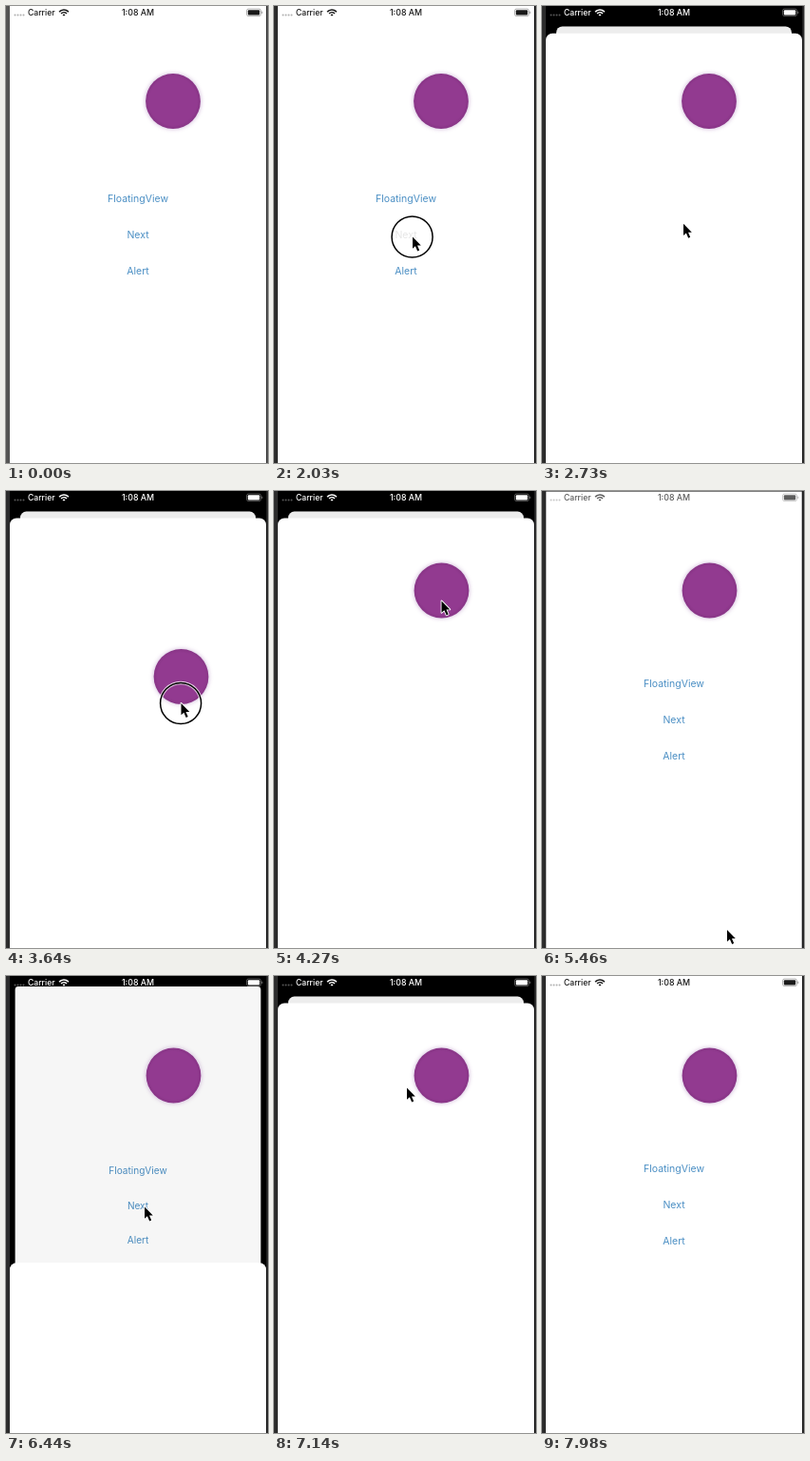
These frames come from a looping animation (276 by 480 pixels, 8000 ms). An HTML page with a canvas:

```html
<!DOCTYPE html>
<html lang="en">
<head>
<meta charset="utf-8">
<title>Floating view demo</title>
<style>
html, body { margin: 0; width: 276px; height: 480px; overflow: hidden; background: #fff; }
canvas { display: block; }
</style>
</head>
<body>
<canvas id="stage" width="276" height="480"></canvas>
<script>
const ctx = document.getElementById('stage').getContext('2d');
const LOOP = 8000, STEP = 70;
const LEFT = 4, WIDTH = 270, HEIGHT = 585, SHEET_TOP = 28.5, TRAVEL = HEIGHT - SHEET_TOP;
const FONT = 'Inter, Roboto, sans-serif';
const BLUE = '#4b8fc4';

// Each move brings the pointer to a new place; bend holds Bezier control points
const entry = { x: 138, y: 405 };
const moves = [
  { from: 350, to: 490, x: 172, y: 249 },
  { from: 770, to: 910, x: 146, y: 242 },
  { from: 2660, to: 3360, x: 176, y: 105 },
  { from: 3430, to: 3570, x: 184.5, y: 205.5 },
  { from: 3570, to: 3640, x: 184.5, y: 222.5 },
  { from: 3640, to: 4200, x: 176.5, y: 115, bend: [{ x: 165, y: 400 }, { x: 20, y: 220 }] },
  { from: 4340, to: 4690, x: 111, y: 78 },
  { from: 4760, to: 5390, x: 195, y: 460.5 },
  { from: 5460, to: 6090, x: 146, y: 242 },
  { from: 6650, to: 7000, x: 140, y: 117 },
  { from: 7290, to: 7850, x: 185, y: 500 }
];
const sheets = [
  { open: 2172, grab: 4760, drop: 5180 },
  { open: 6345, grab: 7290, drop: 7600 }
];
const ballDrag = { from: 3360, to: 4270 };

const mix = (a, b, u) => a + (b - a) * u;

function bezier(a, b, c, d, u) {
  const v = 1 - u;
  return v * v * v * a + 3 * v * v * u * b + 3 * v * u * u * c + u * u * u * d;
}

function tip(t) {
  let at = entry;
  for (const m of moves) {
    if (t < m.from) break;
    const u = Math.min(1, (t - m.from) / (m.to - m.from));
    const along = m.bend
      ? k => bezier(at[k], m.bend[0][k], m.bend[1][k], m[k], u)
      : k => mix(at[k], m[k], u);
    at = { x: along('x'), y: along('y') };
  }
  return at;
}

// Share of the way still to go for a critically damped spring
function spring(ms) {
  const x = Math.max(0, ms) * 0.018;
  return (1 + x) * Math.exp(-x);
}

function openness(t) {
  const s = t < sheets[1].open ? sheets[0] : sheets[1];
  if (t < s.grab) return 1 - spring(t - s.open);
  const dragged = 1 - (tip(Math.min(t, s.drop)).y - tip(s.grab).y) / TRAVEL;
  const p = dragged * spring(t - s.drop);
  return p < 0.01 ? 0 : p;
}

const isTap = t => sheets.some(s => t > s.open - 143 && t < s.open + 68);
const isGrab = t => sheets.some(s => t >= s.grab - STEP && t < s.drop);
const isBallDrag = t => t >= ballDrag.from && t < ballDrag.to;

function box(x, y, w, h, r, color) {
  ctx.fillStyle = color;
  ctx.beginPath();
  ctx.roundRect(x, y, w, h, r);
  ctx.fill();
}

function disc(x, y, r, fill) {
  ctx.fillStyle = fill;
  ctx.beginPath();
  ctx.arc(x, y, r, 0, 7);
  ctx.fill();
}

function text(s, x, y, font, color, align = 'center') {
  ctx.font = `${font} ${FONT}`;
  ctx.fillStyle = color;
  ctx.textAlign = align;
  ctx.fillText(s, x, y);
}

function drawPage(p, tapped) {
  const scale = 1 - 0.0815 * p;
  ctx.save();
  ctx.translate(139, 21.5 * p);
  ctx.scale(scale, scale);
  ctx.translate(-139, 0);
  box(LEFT, 0, WIDTH, HEIGHT, 7 * p, '#fff');
  ['FloatingView', 'Next', 'Alert'].forEach((label, i) => {
    const color = tapped && label === 'Next' ? '#e6e6e6' : BLUE;
    text(label, 139, 206 + 38 * i, '10.5px', color);
  });
  box(LEFT, 0, WIDTH, HEIGHT, 7 * p, `rgba(0,0,0,${0.07 * p})`);
  ctx.restore();
}

function drawStatus(p) {
  const v = Math.round(mix(25, 255, Math.min(1, p * 14)));
  const color = `rgb(${v},${v},${v})`;
  ctx.globalAlpha = 0.35;
  for (let i = 0; i < 4; i++) disc(9.5 + i * 3, 9.5, 1, color);
  ctx.globalAlpha = 1;
  text('Carrier', 23, 10.3, '500 8.6px', color, 'left');
  text('1:08 AM', 139, 10.3, '500 8.8px', color);

  // Wi-Fi fan
  ctx.strokeStyle = color;
  ctx.lineWidth = 1.6;
  for (const r of [1.2, 4, 6.7]) {
    ctx.beginPath();
    ctx.arc(61, 10.7, r, -Math.PI * 0.76, -Math.PI * 0.24);
    ctx.stroke();
  }

  // Battery
  ctx.globalAlpha = 0.45;
  ctx.lineWidth = 0.7;
  ctx.beginPath();
  ctx.roundRect(253.5, 3, 15, 7.6, 2);
  ctx.stroke();
  box(269.3, 5.5, 1, 2.6, 0.5, color);
  ctx.globalAlpha = 1;
  box(254.8, 4.2, 12.4, 5.2, 1, color);
}

function drawBall(x, y) {
  ctx.save();
  ctx.shadowColor = 'rgba(140,80,160,.35)';
  ctx.shadowBlur = 4;
  disc(x, y, 29.6, '#e9dfef');
  ctx.restore();
  const g = ctx.createRadialGradient(x, y, 25, x, y, 29);
  g.addColorStop(0, '#923a90');
  g.addColorStop(1, '#883586');
  disc(x, y, 28.9, g);
}

function outline(color, width) {
  ctx.strokeStyle = color;
  ctx.lineWidth = width;
  ctx.stroke();
}

function drawPointer({ x, y }, pressed) {
  ctx.save();
  ctx.translate(x, y);
  ctx.lineJoin = 'round';
  if (pressed) {
    ctx.beginPath();
    ctx.arc(-0.4, 0.5, 21.5, 0, 7);
    outline('rgba(255,255,255,.75)', 3.4);
    outline('#000', 1.5);
  }
  const arrow = new Path2D('M0 .4V12.8L2.9 10.2 5.2 15.4 7.2 14.5 5 9.4H8.8Z');
  ctx.strokeStyle = '#fff';
  ctx.lineWidth = 1.8;
  ctx.stroke(arrow);
  ctx.fillStyle = '#000';
  ctx.fill(arrow);
  ctx.restore();
}

function draw(t) {
  const p = openness(t);

  ctx.fillStyle = '#000';
  ctx.fillRect(0, 0, 276, 480);
  drawPage(p, isTap(t));
  if (p > 0) box(LEFT, mix(HEIGHT, SHEET_TOP, p), WIDTH, HEIGHT, 7, '#fff');
  drawStatus(p);

  const edge = t < 2030 ? '#555' : '#2c2c2c';
  box(0, 0, LEFT, 480, 0, edge);
  box(274.3, 0, 2, 480, 0, edge);

  // The ball trails the pointer by one step
  const lead = tip(Math.min(t, ballDrag.to) - STEP);
  if (t < 3570) drawBall(176, 100);
  else drawBall(lead.x, lead.y - 10.5);

  if (t >= moves[0].from) drawPointer(tip(t), isTap(t) || isGrab(t) || isBallDrag(t));
}

const start = performance.now();
function tick() {
  const t = (performance.now() - start) % LOOP;
  draw(Math.floor(t / STEP) * STEP);
  requestAnimationFrame(tick);
}
tick();
</script>
</body>
</html>
```
